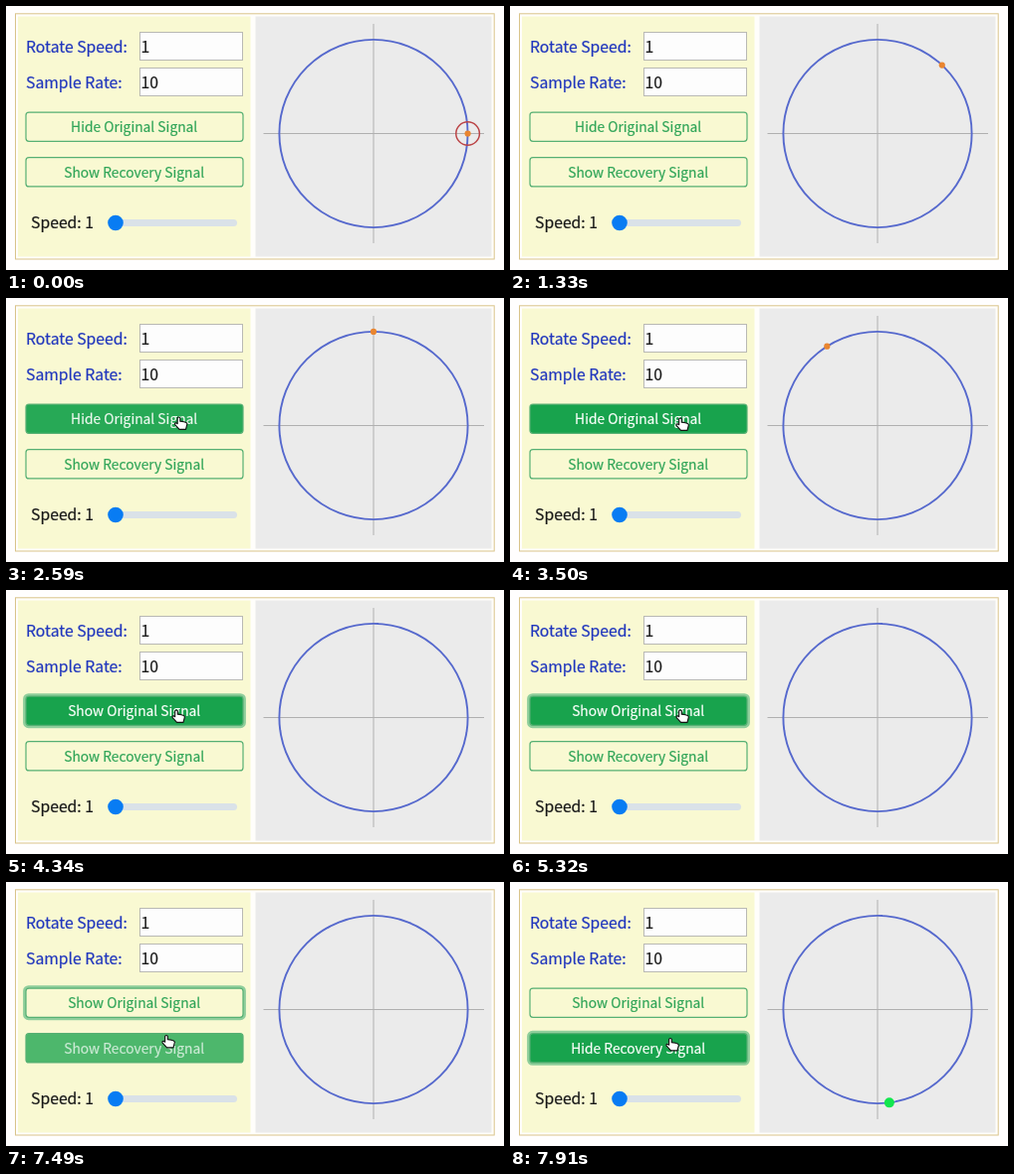
These frames come from a looping animation (500x266 px, 8000 ms). An HTML page:

```html
<!DOCTYPE html>
<html lang="en">
<head>
<meta charset="utf-8">
<title>Signal sampling</title>
<style>
html, body { margin: 0; width: 100%; height: 100%; overflow: hidden; background: #fffefe; }
svg { display: block; width: 500px; height: 266px; }
text {
  font: 15.75px "Noto Sans CJK SC", "Noto Sans CJK JP", "Noto Sans CJK", "Noto Sans", sans-serif;
  stroke-width: .2;
}
.label { fill: #2036bd; stroke: #2036bd; }
.value { fill: #181818; stroke: #181818; }
.field { fill: #fdfdfd; stroke: #b9b9b4; }
.button text { font-size: 13.8px; text-anchor: middle; }
.face { stroke: #56b073; stroke-width: 1.2; }
.halo { fill: none; stroke: #8fce9b; stroke-width: 3; }
.axis { stroke: #b0b0b0; }
</style>
</head>
<body>
<svg viewBox="0 0 500 266">
  <rect x="9.5" y="7.8" width="480.7" height="247.2" fill="#fffefb" stroke="#d9c48a"/>
  <rect x="12" y="10.5" width="233.5" height="242" fill="#f9f9d2"/>
  <rect x="250.5" y="10.5" width="237" height="242" fill="#ebebeb"/>

  <text class="label" x="20" y="46.8">Rotate Speed:</text>
  <text class="label" x="20" y="83">Sample Rate:</text>
  <rect class="field" x="134.5" y="26.5" width="103" height="28"/>
  <rect class="field" x="134.5" y="62.5" width="103" height="28"/>
  <text class="value" x="135.5" y="46.8">1</text>
  <text class="value" x="135.5" y="83">10</text>

  <g class="button" id="original">
    <rect class="halo" x="18.6" y="105.7" width="220.8" height="32" rx="4"/>
    <rect class="face" x="20" y="107.1" width="218" height="29.2" rx="3"/>
    <text x="128.7" y="126.8"></text>
  </g>
  <g class="button" id="recovery">
    <rect class="halo" x="18.6" y="151.3" width="220.8" height="32" rx="4"/>
    <rect class="face" x="20" y="152.7" width="218" height="29.2" rx="3"/>
    <text x="128.7" y="172.6"></text>
  </g>

  <text class="value" x="25" y="224">Speed: 1</text>
  <rect x="103" y="215" width="129" height="7" rx="3.5" fill="#dae2e8"/>
  <circle cx="110" cy="218.5" r="7.8" fill="#087cf3"/>

  <path class="axis" d="M258.5 128.5H480M369 18V239"/>
  <circle cx="369" cy="128.5" r="94.6" fill="none" stroke="#5669cd" stroke-width="1.9"/>
  <circle id="signalDot" r="3.1" fill="#e98530"/>
  <circle id="sampleRing" r="11.8" fill="none" stroke="#bb4446" stroke-width="1.5"/>
  <circle id="recoveryDot" r="5" fill="#12e64e"/>

  <path id="cursor" d="M-1.4 .8Q0-.8 1.4 .8V4.4L3.4 4.6 5.4 5 7.8 5.8Q8.9 6.3 8.8 7.6L7.4 13H.6L-4 8Q-4.8 6.4-3 6L-1.4 7Z"
    fill="#fff" stroke="#111" stroke-width="1.2" stroke-linejoin="round"/>
</svg>
<script>
const LOOP = 8000, TICK = 70;
const CENTER = { x: 369, y: 128.5 }, RADIUS = 94.6;
const STEP = Math.PI / 50; // one hundredth of a turn
const FADE = 150;
const HIDE_AT = 4340, RESYNC_AT = 6160, RECOVER_AT = 7840;

const GREEN = [24, 163, 77], TEXT_GREEN = [48, 165, 88];
const PALE = [249, 249, 210], WHITE = [250, 255, 250];

// time, x, y of the pointer's fingertip
const POINTER = [
  [2450, 187, 146], [2590, 173.5, 120], [2730, 171, 121],
  [7140, 171, 121], [7490, 161, 154.5], [7630, 161, 157.5]
];

const byId = id => document.getElementById(id);
const clamp = v => Math.min(1, Math.max(0, v));
const mix = (a, b, k) => a + (b - a) * k;
const color = (a, b, k) => `rgb(${a.map((v, i) => Math.round(mix(v, b[i], k)))})`;
const show = (el, on) => el.style.display = on ? "" : "none";
const ramp = (t, start) => clamp((t - start) / FADE);

function pointerAt(t) {
  const i = POINTER.findIndex(p => p[0] > t);
  if (i < 0) return POINTER[POINTER.length - 1].slice(1);
  if (i === 0) return null;
  const [t0, x0, y0] = POINTER[i - 1], [t1, x1, y1] = POINTER[i];
  const k = (t - t0) / (t1 - t0);
  return [mix(x0, x1, k), mix(y0, y1, k)];
}

function paintButton(id, label, hover, focused) {
  const [halo, face, text] = byId(id).children;
  show(halo, focused);
  face.style.fill = color(PALE, GREEN, hover);
  text.style.fill = text.style.stroke = color(TEXT_GREEN, WHITE, hover);
  if (text.textContent !== label) text.textContent = label;
}

function placeOnCircle(el, step, visible) {
  show(el, visible);
  el.setAttribute("cx", CENTER.x + RADIUS * Math.cos(step * STEP));
  el.setAttribute("cy", CENTER.y - RADIUS * Math.sin(step * STEP));
}

function draw(time) {
  const tick = Math.floor((time % LOOP) / TICK), t = tick * TICK;
  // the signal advances on two of every three ticks
  const lead = t >= HIDE_AT && t < RESYNC_AT ? 1 : 0;
  const step = tick - Math.floor(tick / 3) + lead;
  const sampling = (step + 1) % 10 < 3;

  placeOnCircle(byId("signalDot"), step, t < HIDE_AT);
  placeOnCircle(byId("sampleRing"), step, sampling);
  placeOnCircle(byId("recoveryDot"), step + 1, t >= RECOVER_AT);

  paintButton("original", (t < HIDE_AT ? "Hide" : "Show") + " Original Signal",
    ramp(t, 2450) - ramp(t, 7280), t >= 4270 && t < 7770);
  paintButton("recovery", (t < RECOVER_AT ? "Show" : "Hide") + " Recovery Signal",
    ramp(t, 7375), t >= 7770);

  const tip = pointerAt(t), cursor = byId("cursor");
  show(cursor, tip);
  if (tip) cursor.setAttribute("transform", `translate(${tip}) scale(.95)`);
}

const start = performance.now();
function frame() {
  draw(performance.now() - start);
  requestAnimationFrame(frame);
}
frame();
</script>
</body>
</html>
```
